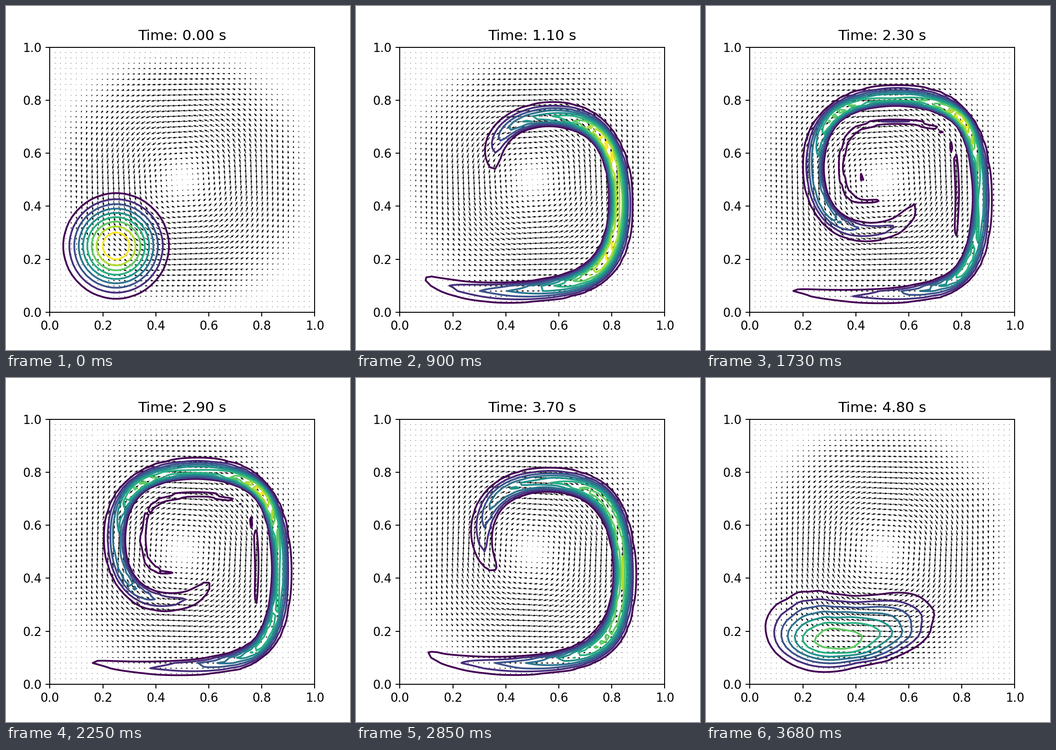
Write a matplotlib script that moves like this. It is 748 by 748 pixels and loops after 3760 ms.

```python
import numpy as np
import matplotlib.pyplot as plt
from matplotlib.animation import FuncAnimation

# Swirling deformation flow that reverses halfway, advected with Lax-Wendroff
CELLS = 50
H = 1 / CELLS
PERIOD = 5.0
FRAMES = 50
LOOP_MS = 3760
FRAME_TIME = PERIOD / FRAMES
SUBSTEPS = 10
DT = FRAME_TIME / SUBSTEPS
LEVELS = np.linspace(0.1, 0.9, 9)

grid = np.linspace(0, 1, CELLS + 1)
X, Y = np.meshgrid(grid, grid)
U = np.sin(np.pi * X) ** 2 * np.sin(2 * np.pi * Y)
V = -np.sin(np.pi * Y) ** 2 * np.sin(2 * np.pi * X)


def along_flow(field):
    d_dy, d_dx = np.gradient(field, H)
    return U * d_dx + V * d_dy


ACC_X, ACC_Y = along_flow(U), along_flow(V)


def cosine_bell(cx=0.25, cy=0.25, radius=0.25):
    r = np.minimum(np.hypot(X - cx, Y - cy) / radius, 1)
    return 0.5 * (1 + np.cos(np.pi * r))


def neighbour(f, di, dj):
    return np.roll(f, (-dj, -di), axis=(0, 1))


def advance(f, t):
    tau = DT * np.cos(np.pi * (t + DT / 2) / PERIOD)
    east, west = neighbour(f, 1, 0), neighbour(f, -1, 0)
    north, south = neighbour(f, 0, 1), neighbour(f, 0, -1)
    fx, fy = (east - west) / (2 * H), (north - south) / (2 * H)
    fxx = (east - 2 * f + west) / H**2
    fyy = (north - 2 * f + south) / H**2
    fxy = (neighbour(north - south, 1, 0) - neighbour(north - south, -1, 0)) / (4 * H**2)
    first = U * fx + V * fy
    second = U**2 * fxx + V**2 * fyy + 2 * U * V * fxy + ACC_X * fx + ACC_Y * fy
    return f - tau * first + tau**2 / 2 * second


def simulate():
    f = cosine_bell()
    states = [f]
    for step in range((FRAMES - 1) * SUBSTEPS):
        f = advance(f, step * DT)
        if (step + 1) % SUBSTEPS == 0:
            states.append(f)
    return states


states = simulate()

fig, ax = plt.subplots(figsize=(4, 4), dpi=187)
ax.set_aspect("equal")
ax.set(xlim=(0, 1), ylim=(0, 1))
arrows = ax.quiver(X, Y, U, V)
title = ax.set_title("")
contours = []


def draw(frame):
    while contours:
        contours.pop().remove()
    contours.append(ax.contour(X, Y, states[frame], levels=LEVELS))
    sign = 1 if frame <= FRAMES // 2 else -1
    arrows.set_UVC(sign * U, sign * V)
    title.set_text(f"Time: {frame * FRAME_TIME:.2f} s")
    return [arrows, title]


anim = FuncAnimation(fig, draw, frames=FRAMES, interval=LOOP_MS / FRAMES,
                     init_func=lambda: [], repeat=True, repeat_delay=0)
plt.show()
```
